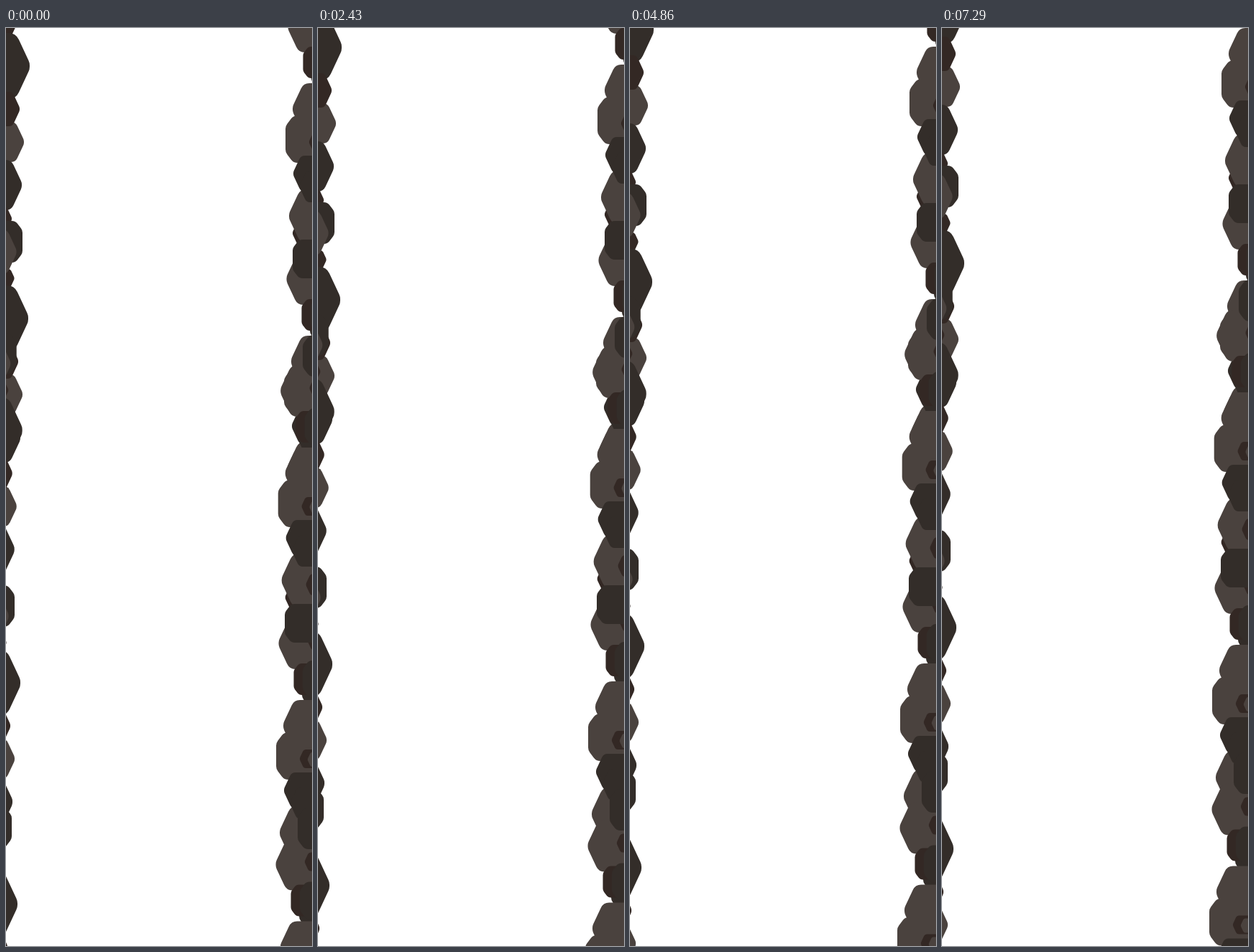
These frames come from a looping animation (427 px wide and 1280 px high, 8 s). An HTML page with a canvas:

```html
<!DOCTYPE html>
<html lang="en">
<head>
<meta charset="utf-8">
<title>Rock walls</title>
<style>
html, body { margin: 0; width: 100%; height: 100%; overflow: hidden; background: #fff; }
canvas { display: block; }
</style>
</head>
<body>
<canvas id="stage" width="427" height="1280"></canvas>
<script>
const ctx = document.getElementById('stage').getContext('2d');
const DARK = '#332d29', BROWN = '#332824', GREY = '#4a423e';
const LOOP = 8000, STEP = 810, RISE = 8.53;
const POINTED = 0.1, BLUNT = 0.55;

// Both walls repeat one band of rocks at these shifts.
const bands = [[0, 0], [-2, 352], [-10.3, 508], [-13, 860], [-17, 1168.5]];

// A rounded half hexagon growing out of the nearer side of the stage.
function rock(color, x, y, half, bluntness = POINTED) {
  const side = x < 200 ? -1 : 1;
  const deep = x + side * 80;
  const shoulder = x + side * half * (0.44 - 0.18 * bluntness);
  const flat = half * bluntness;
  const corners = [
    [shoulder, y - half], [x, y - flat],
    [x, y + flat], [shoulder, y + half], [deep, y + half]
  ];
  ctx.fillStyle = color;
  ctx.beginPath();
  ctx.moveTo(deep, y - half);
  for (let i = 0; i < 4; i++) ctx.arcTo(...corners[i], ...corners[i + 1], half * 0.35);
  ctx.lineTo(...corners[4]);
  ctx.fill();
}

function leftBand() {
  rock(BROWN, 13.5, -3, 13);
  rock(DARK, 25, -54, 29, BLUNT);
  rock(GREY, 16.5, -40, 31);
  rock(DARK, 33, 53, 46);
  rock(GREY, 25, 159, 28);
  rock(BROWN, 19, 113, 24);
  rock(DARK, 22, 219, 35);
  rock(BROWN, 8, 266, 16);
}

function rightBand(odd) {
  rock(GREY, 393.5, -2, 36);
  rock(BROWN, 434, -6, 13);
  if (odd) rock(DARK, 402, -30, 27, BLUNT);
  rock(DARK, 426, 56, 32, BLUNT);
  rock(BROWN, 414.5, 48, 22, BLUNT);
  rock(DARK, 427, 48, 26, BLUNT);
  rock(BROWN, 400, 286, 18);
  rock(GREY, 395, 262, 37);
  rock(BROWN, 429, 268, 15);
  rock(GREY, 400, 113, 36);
  rock(GREY, 390, 155, 33, BLUNT);
  rock(BROWN, 423, 159, 13);
  rock(GREY, 434, 160, 10);
  rock(DARK, 401, 203, 25);
  rock(DARK, 410, 221, 22);
}

function walls() {
  bands.forEach(([dx, dy], i) => {
    ctx.save();
    ctx.translate(dx, dy);
    leftBand();
    rightBand(i % 2);
    ctx.restore();
  });
  rock(DARK, 414, 457, 29, BLUNT);
  rock(DARK, 407, 1116, 29, BLUNT);
}

function draw(now) {
  const step = Math.floor(now % LOOP / STEP);
  ctx.fillStyle = '#fff';
  ctx.fillRect(0, 0, 427, 1280);
  ctx.save();
  ctx.translate(0, -Math.round(step * RISE));
  walls();
  ctx.restore();
}

const start = performance.now();
function tick() {
  draw(performance.now() - start);
  requestAnimationFrame(tick);
}
tick();
</script>
</body>
</html>
```
